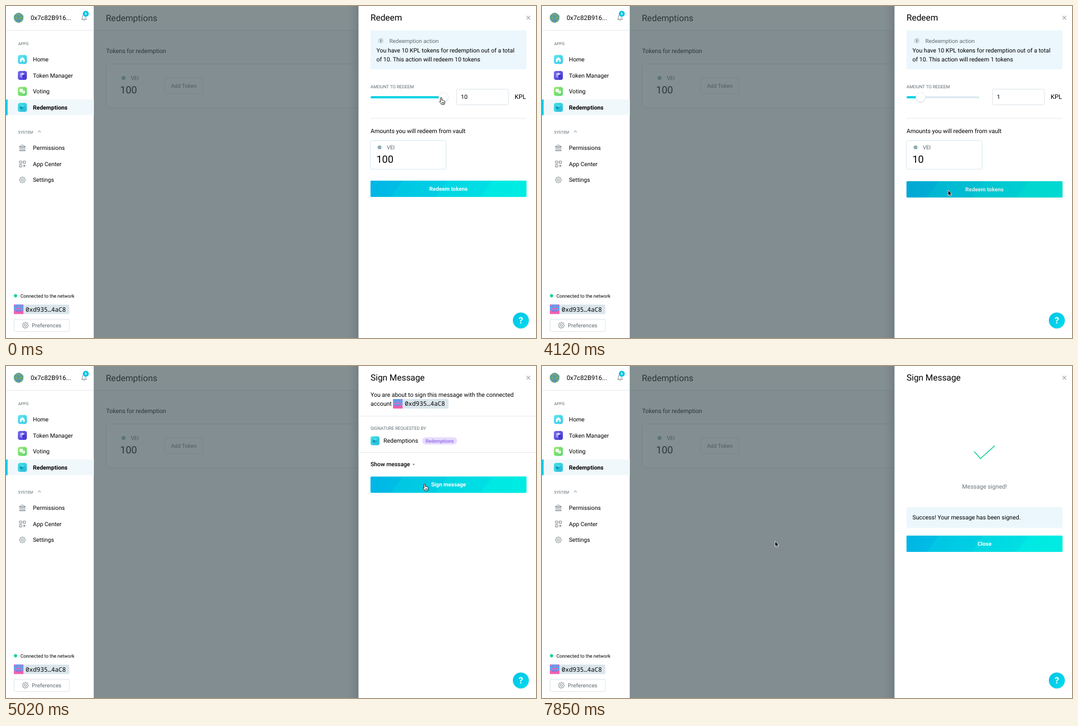
These frames come from a looping animation (945 by 593 pixels, 8 s). An HTML page:

```html
<!DOCTYPE html>
<html lang="en">
<head>
<meta charset="utf-8">
<title>Redeem tokens</title>
<style>
html, body { margin: 0; width: 100%; height: 100%; overflow: hidden; background: #fff; }
svg { display: block; width: 945px; height: 593px; }
text { font-family: Roboto, sans-serif; white-space: pre; text-rendering: geometricPrecision; }
.mono { font-family: "Noto Sans Mono", monospace; }
</style>
</head>
<body>
<svg id="stage" viewBox="0 0 945 593" xmlns="http://www.w3.org/2000/svg"></svg>
<script>
const LOOP = 8000, TICK = 147.6, PANEL_W = 316.5;
const GREY = '#5f6a70', LINE = '#e4ebef';
const COIN = 'VEI', SHARE = 'KPL', WALLET = 'Novamand';
const ACCOUNT = '0xd935…4aC8';

// Text is placed by the middle of its capitals.
function text(x, mid, str, size, o = {}) {
  return `<text x="${x}" y="${(mid + size * 0.355).toFixed(2)}" font-size="${size}"` +
    ` fill="${o.fill || '#000'}" font-weight="${o.weight || 400}"` +
    (o.center ? ' text-anchor="middle"' : '') +
    (o.mono ? ' class="mono"' : '') + (o.id ? ` id="${o.id}"` : '') + `>${str}</text>`;
}

function rect(x, y, w, h, fill, o = {}) {
  return `<rect x="${x}" y="${y}" width="${w}" height="${h}" fill="${fill}" rx="${o.r || 0}"` +
    (o.stroke ? ` stroke="${o.stroke}"` : '') + (o.more || '') + '/>';
}

const circle = (x, y, r, fill, more = '') =>
  `<circle cx="${x}" cy="${y}" r="${r}" fill="${fill}" ${more}/>`;

const path = (d, stroke, w = 1, fill = 'none') =>
  `<path d="${d}" stroke="${stroke}" stroke-width="${w}" fill="${fill}"/>`;

const hline = (x1, x2, y, color = LINE) => path(`M${x1} ${y}H${x2}`, color);

const group = (id, body, more = '') => `<g id="${id}" ${more}>${body}</g>`;

const at = (x, y, body) => `<g transform="translate(${x} ${y})">${body}</g>`;

// Mirrored block avatar from a small seeded generator.
function blocks(x, y, size, colors, seed) {
  const n = 8, c = size / n;
  let out = rect(x, y, size, size, colors[0]);
  for (let row = 0; row < n; row++) {
    for (let col = 0; col < n / 2; col++) {
      const s = Math.abs(Math.sin(seed + row * 12.99 + col * 78.23) * 43758.5) % 1;
      if (s < 0.55) continue;
      const fill = colors[s > 0.85 ? 2 : 1];
      for (const i of [col, n - 1 - col])
        out += rect((x + i * c).toFixed(2), (y + row * c).toFixed(2), c + 0.1, c + 0.1, fill);
    }
  }
  return out;
}

const badge = (x, y) =>
  rect(x, y, 99, 17, '#dae6ec', { r: 2 }) +
  blocks(x, y, 17, ['#f25fae', '#55a8f5', '#8a74d8'], 41) +
  text(x + 21, y + 8.6, ACCOUNT, 10.9, { mono: true });

function button(x, y, label) {
  const w = 278.6, h = 29.4;
  const band = (b, op) =>
    `<path d="M${b} ${h}L${b + 22} 0H${w}V${h}Z" fill="#00f4e0" opacity="${op}"/>`;
  return at(x - 0.3, y - 0.2, `<g clip-path="url(#btnClip)">` + rect(0, 0, w, h, 'url(#btn)') +
    band(36, 0.16) + band(116, 0.2) + band(196, 0.4) + '</g>' +
    text(w / 2, 14.6, label, 9.8, { fill: '#fff', weight: 700, center: true }));
}

const icons = {
  home: rect(0, 0, 16, 16, 'url(#icHome)', { r: 4 }) +
    '<path d="M3.8 7.6L8 3.7l4.2 3.9v4.9H9.4V9.3H6.6v3.2H3.8z" fill="#fff"/>',
  manager: rect(0, 0, 16, 16, 'url(#icManager)', { r: 4 }) +
    '<path d="M8 3.2l4.5 2.2L8 7.7 3.5 5.4z" fill="#d9dcff"/>' +
    '<path d="M3.5 5.4L8 7.7v5L3.5 10.4z" fill="#9a97f5"/>' +
    '<path d="M12.5 5.4L8 7.7v5l4.5-2.3z" fill="#4034bd"/>',
  voting: rect(0, 0, 16, 16, 'url(#icVoting)', { r: 4 }) +
    rect(3, 3.6, 6, 5.6, '#fff', { r: 1.4 }) + rect(7, 6.6, 6, 5.4, '#d9fbd2', { r: 1.4 }),
  redeem: rect(0, 0, 16, 16, 'url(#icRedeem)', { r: 4 }) +
    '<path d="M3.7 5.6l4.3 1.5v5L3.7 10.4z" fill="#1597b6"/>' +
    '<path d="M12.3 5.6L8 7.1v5l4.3-1.7z" fill="#25b8cf"/>' +
    '<path d="M3.7 5.6L8 4.2l4.3 1.4L8 7.1z" fill="#5fe3ea"/>'
};

function gear(x, y) {
  let d = '';
  for (let i = 0; i < 32; i++) {
    const a = i / 32 * Math.PI * 2, r = i % 4 < 2 ? 5.4 : 4.2;
    d += (i ? 'L' : 'M') + (x + r * Math.cos(a)).toFixed(2) + ' ' + (y + r * Math.sin(a)).toFixed(2);
  }
  return path(d + 'Z', '#68737a', 0.9) + circle(x, y, 1.9, 'none', 'stroke="#68737a" stroke-width=".9"');
}

const gradient = (id, a, b, dir = 'x2="1" y2="0"') =>
  `<linearGradient id="${id}" x1="0" y1="0" ${dir}><stop stop-color="${a}"/>` +
  `<stop offset="1" stop-color="${b}"/></linearGradient>`;

const down = 'x2="1" y2="1"';
const defs = '<defs>' +
  gradient('btn', '#00b6e6', '#00dce2') +
  gradient('icHome', '#62e8ec', '#2fc6ec', down) +
  gradient('icManager', '#7a6cf0', '#3f32d2', down) +
  gradient('icVoting', '#9be96c', '#4fd66d', down) +
  gradient('icRedeem', '#45e5e6', '#25b9de', down) +
  gradient('help', '#00c4e6', '#00dcee', down) +
  '<linearGradient id="shade"><stop stop-color="#1c2b33" stop-opacity="0"/>' +
  '<stop offset=".55" stop-color="#1c2b33" stop-opacity=".06"/>' +
  '<stop offset="1" stop-color="#1c2b33" stop-opacity=".17"/></linearGradient>' +
  '<clipPath id="btnClip"><rect width="278.6" height="29.4" rx="2"/></clipPath>' +
  '<clipPath id="face"><circle cx="22.5" cy="21" r="8.7"/></clipPath></defs>';

const coin = (x, y) => circle(x, y, 3.6, '#8fb0b4') +
  text(x + 13, y, COIN, 9.6, { fill: GREY });

const page =
  rect(156, 0, 789, 593, '#f7fbfd') + rect(156, 0, 789, 43, '#fff') +
  hline(156, 945, 43.5, '#dde5e9') +
  text(178, 21, 'Redemptions', 15.6) +
  text(178.5, 80.5, 'Tokens for redemption', 10.65) +
  rect(178.5, 103.5, 745, 78, '#f9fcfd', { r: 2, stroke: '#dde5e9' }) +
  coin(209.5, 128.5) + text(203.5, 149.8, '100', 17.8) +
  rect(282.5, 128, 69, 28.5, '#f9fcfd', { r: 2, stroke: '#dde5e9' }) +
  text(317, 142.3, 'Add Token', 9.7, { fill: GREY, center: true });

const shell = title =>
  rect(608.5, 0, 20, 593, 'url(#shade)') + rect(628.5, 0, 317, 593, '#fff') +
  text(650, 21, title, 15.4) +
  path('M928.2 17.7l6.4 6.4m0-6.4l-6.4 6.4', '#939da3', 1.1);

const redeemPanel = shell('Redeem') +
  rect(650, 43.5, 278, 69.5, '#ebf7fd', { r: 2 }) +
  circle(668.3, 62, 5, '#cfdae0') +
  text(668.3, 62, '!', 7.5, { fill: '#56626a', weight: 700, center: true }) +
  text(683.5, 62.3, 'Redeemption action', 9.9, { fill: GREY }) +
  text(660.5, 79.3, `You have 10 ${SHARE} tokens for redemption out of a total`, 10.5) +
  text(660.5, 95, '', 10.5, { id: 'summary' }) +
  text(650, 144, 'AMOUNT TO REDEEM', 7.95, { fill: GREY }) +
  rect(650, 161, 130, 4, '#e0ecf1', { r: 2 }) +
  rect(650, 161, 130, 4, '#06d2e2', { r: 2, more: ' id="fill"' }) +
  group('knob', circle(0, 1, 9.2, '#4a6470', 'opacity=".13"') +
    circle(0, 0, 8.5, '#fff', 'stroke="#e3eaee" stroke-width=".8"')) +
  rect(803.5, 148.5, 92, 28, '#fff', { r: 2, stroke: '#dde4e9' }) +
  text(811, 162.5, '', 10.6, { id: 'field' }) +
  text(907, 162, SHARE, 11.2) +
  hline(650, 928, 200.5) +
  text(650, 223, 'Amounts you will redeem from vault', 10.6) +
  rect(649.5, 240.5, 135, 51, '#fff', { r: 2, stroke: '#d5e9f1' }) +
  coin(666, 252.5) + text(660.5, 274, '', 18, { id: 'payout' }) +
  group('redeemBtn', button(650, 312, 'Redeem tokens') +
    rect(649.7, 311.8, 278.6, 29.4, '#000', { r: 2, more: ' id="redeemDim" opacity="0"' }));

const request =
  text(650, 51.5, 'You are about to sign this message with the connected', 10.5) +
  text(650, 67.5, 'account', 10.5) + badge(690, 59) +
  hline(628.5, 945, 89.5) +
  text(650, 111, 'SIGNATURE REQUESTED BY', 7.95, { fill: GREY }) +
  at(650, 125.5, icons.redeem) + text(673, 133.5, 'Redemptions', 10.5) +
  rect(742, 127.2, 62.5, 13, '#e6dcfd', { r: 6.5 }) +
  text(748, 134, 'Redemptions', 8.5, { fill: '#9567ea', weight: 500 }) +
  hline(628.5, 945, 154.5) +
  text(650, 175.5, 'Show message', 10.35, { weight: 500 }) +
  '<path d="M724.3 174.8h5.2l-2.6 2.9z" fill="#8e999f"/>' +
  group('signBtn', button(650, 197.5, 'Sign message'));

const notice = (status, note, color, w) =>
  path('M770.5 152.5L781.7 165.3L807.3 142.3', color, w) +
  text(789, 215.5, status, 10.6, { fill: '#69747a', center: true }) +
  rect(650, 252, 278, 37, '#ebf7fd', { r: 2 }) +
  text(660.5, 270.2, note, 10.5);

const signPanel = shell('Sign Message') +
  group('request', request) +
  group('waiting', notice('Waiting for signature…', `Open ${WALLET} to sign your message.`, '#d9dfe2', 1)) +
  group('signed', notice('Message signed!', 'Success! Your message has been signed.', '#1fcf9f', 1.6) +
    button(650, 303, 'Close'));

const navItem = (icon, label, mid, weight) =>
  at(21.2, mid - 8, icons[icon]) + text(48, mid, label, 10.35, { weight });

const ink = '#68737a';
const sidebar = rect(156.5, 0, 1.5, 593, '#1c2b33', { more: ' opacity=".08"' }) +
  rect(0, 0, 156.5, 593, '#fff') +
  `<g clip-path="url(#face)">${blocks(13.5, 12, 18, ['#82ab62', '#4a9ca8', '#5f93b8'], 97)}</g>` +
  text(44, 21.2, '0x7c82B916...', 11.3) +
  path('M134.8 23.8c1.4-1.2 1.2-2.6 1.4-4.6.3-2.3 1.5-3.4 3-3.4s2.7 1.1 3 3.4c.2 2 0 3.4 1.4 4.6zM138 24.6a1.3 1.3 0 0 0 2.5 0', ink, 0.9) +
  circle(142.3, 13.8, 5.3, '#00c4e2') +
  text(142.3, 13.9, '6', 7, { fill: '#fff', weight: 500, center: true }) +
  hline(0, 156.5, 43.5) +
  text(21.5, 67, 'APPS', 7.4, { fill: GREY }) +
  rect(0, 167, 156.5, 28, '#f1f8fb') + rect(0, 167, 2.8, 28, '#00c8e4') +
  navItem('home', 'Home', 95.5) + navItem('manager', 'Token Manager', 124) +
  navItem('voting', 'Voting', 152.5) + navItem('redeem', 'Redemptions', 181, 700) +
  text(21.5, 225.3, 'SYSTEM', 7, { fill: GREY }) +
  path('M57.2 225.3l2.5-2.3 2.5 2.3', ink, 1) +
  path('M23.6 251.5L29.2 248l5.6 3.5zM23.6 258.6h11.2M25.2 252v6M27.9 252v6M30.6 252v6M33.3 252v6', ink, 0.9) +
  text(48, 253.7, 'Permissions', 10.3) +
  path('M24 277h4v4h-4zM30.5 277h4v4h-4zM24 283.5h4v4h-4zM32.5 283.2v4.6M30.2 285.5h4.6', ink, 0.9) +
  text(48, 282.2, 'App Center', 10.3) +
  gear(29.2, 310.5) + text(48, 310.7, 'Settings', 10.3) +
  circle(17, 517.5, 2.9, '#1fcf9f') +
  text(25.7, 517.7, 'Connected to the network', 8.45) +
  badge(14, 533.2) +
  rect(14.5, 559.5, 98.5, 22, '#fff', { r: 2, stroke: '#dde4e9' }) +
  gear(34.5, 570.3) + text(46, 570.5, 'Preferences', 9.9, { fill: GREY });

const help = circle(918, 562.3, 14.6, '#5a7480', 'opacity=".15"') +
  circle(918, 561.6, 14.2, 'url(#help)') +
  text(918, 561.8, '?', 16, { fill: '#fff', weight: 700, center: true });

const cursor =
  group('arrow', path('M0 0V9.6L2.2 7.6L3.7 11L5.4 10.2L4 7H6.9Z', '#fff', 0.8, '#000')) +
  group('hand', path('M1 0c.8 0 1.2.6 1.2 1.2v3.4c1-.3 1.6 0 1.8.6.9-.3 1.6.1 1.8.7 1-.2 1.7.3 1.7 1.3V9' +
    'c0 1.6-1 2.3-1 3.4H1.4C1 11-.8 9.2-1.6 7.9c-.5-1 .4-1.6 1.2-1l.2.5V1.2C-.2.6.2 0 1 0z' +
    'M2.4 8.4v2M4 8.4v2M5.5 8.4v2', '#000', 0.9, '#fff'));

const veil = id => rect(156, 0, 789, 593, '#425358', { more: ` id="${id}"` });

const stage = document.getElementById('stage');
stage.innerHTML = defs + page + veil('veilA') + group('panelA', redeemPanel) +
  veil('veilB') + group('panelB', signPanel) + sidebar + help + group('cursor', cursor);

const el = {};
stage.querySelectorAll('[id]').forEach(n => { el[n.id] = n; });

// Piecewise motion over ticks: [tick, value, ...] rows, read by column.
function track(rows, n, col = 1) {
  if (n <= rows[0][0]) return rows[0][col];
  for (let i = 1; i < rows.length; i++) {
    const a = rows[i - 1], b = rows[i];
    if (n <= b[0]) return a[col] + (b[col] - a[col]) * (n - a[0]) / (b[0] - a[0]);
  }
  return rows[rows.length - 1][col];
}

const KNOB = [[0, 780], [8, 715], [11, 694], [13, 685], [14, 685], [17, 675]];
const POINTER = [
  [0, 775, 163.5], [8, 711, 168], [11, 691, 170], [13, 682, 170], [14, 682, 170],
  [17, 671, 170], [21, 671, 170], [28, 724, 329], [30, 724, 329],
  [34, 745.5, 210.5], [36, 745.5, 210.5], [41, 640, 600]
];
const LEAVE = [[28, 0], [29, 150], [30, 300], [31, PANEL_W]];
const ENTER = [[28, PANEL_W], [29, 198], [30, 40], [31, 5], [32, 0]];

const set = (id, key, v) => el[id].setAttribute(key, v);
const show = (id, on) => set(id, 'visibility', on ? 'visible' : 'hidden');
const move = (id, x, y = 0) => set(id, 'transform', `translate(${x} ${y})`);

function slide(panel, veilId, off, power) {
  const p = 1 - off / PANEL_W;
  move(panel, off);
  show(panel, p > 0);
  set(veilId, 'opacity', 0.65 * Math.pow(p, power));
}

function draw(ms) {
  // The screen refreshes in coarse ticks.
  const n = Math.floor((ms + 15) / TICK);

  const knob = track(KNOB, n), value = Math.floor((knob - 650) / 13);
  move('knob', knob, 163);
  set('fill', 'width', knob - 650);
  el.summary.textContent = `of 10. This action will redeem ${value} tokens`;
  el.field.textContent = value;
  el.payout.textContent = value * 10;

  const pressed = n === 28;
  move('redeemBtn', 0, pressed ? 1 : 0);
  set('redeemDim', 'opacity', pressed ? 0.08 : 0);
  move('signBtn', 0, n === 36 ? 1 : 0);

  slide('panelA', 'veilA', track(LEAVE, n), 1);
  slide('panelB', 'veilB', track(ENTER, n), 0.78);

  const wait = track([[37, 0], [39, 1]], n), done = n >= 50;
  set('request', 'opacity', track([[36, 1], [38, 0]], n));
  set('waiting', 'opacity', done ? 0 : wait);
  set('signed', 'opacity', done ? 1 : 0);

  const back = n >= 53, hand = n < 23 || (n >= 34 && n < 37);
  if (back) move('cursor', 415.5, 313);
  else move('cursor', track(POINTER, n), track(POINTER, n, 2));
  set('cursor', 'opacity', n < 41 || back ? 1 : 0);
  set('hand', 'opacity', hand ? 1 : 0);
  set('arrow', 'opacity', hand ? 0 : 1);
}

const start = performance.now();
function loop() {
  draw((performance.now() - start) % LOOP);
  requestAnimationFrame(loop);
}
draw(0);
requestAnimationFrame(loop);
</script>
</body>
</html>
```
